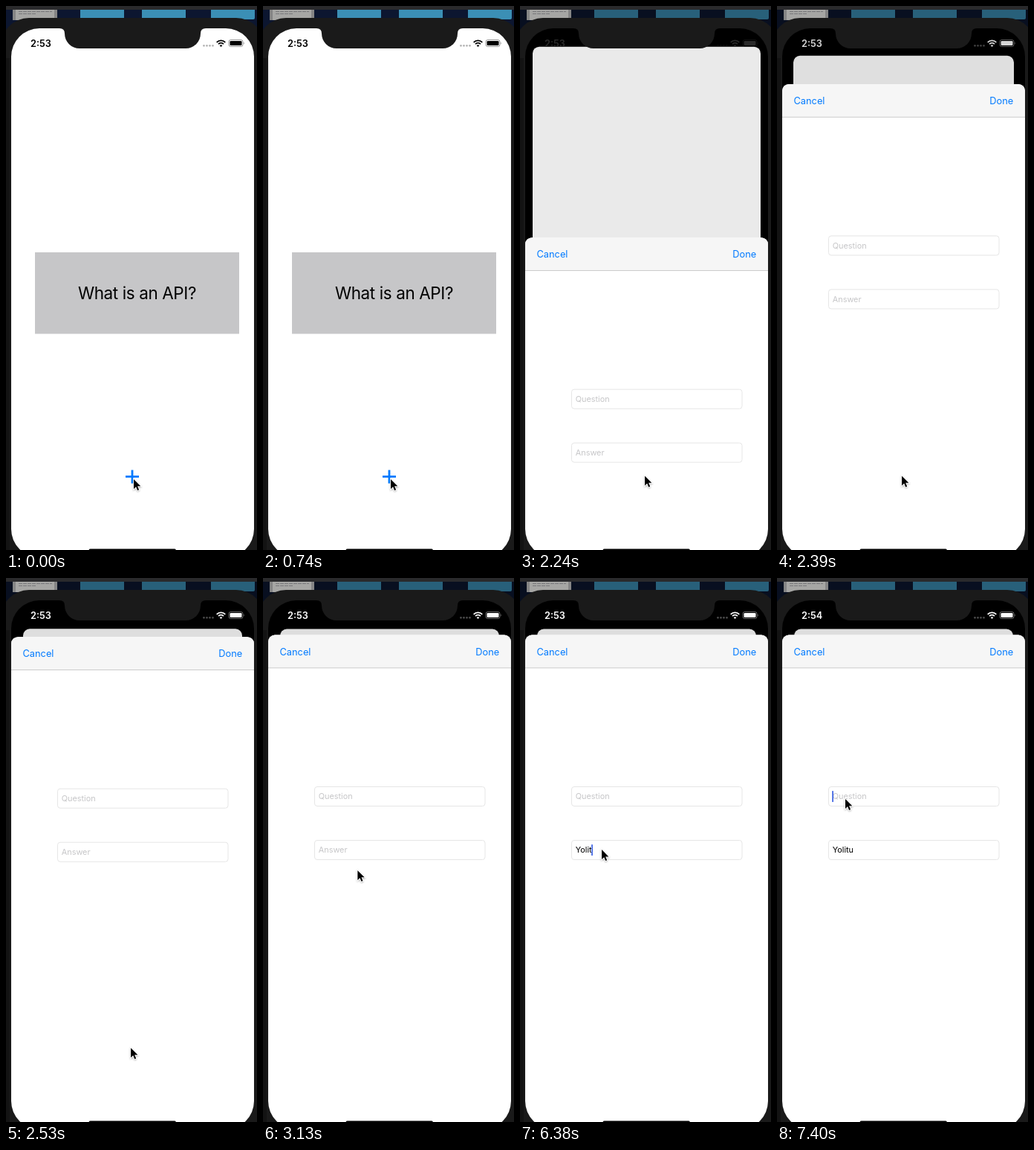
An HTML page for the animation above (8000 ms loop, 338x731 px).

```html
<!DOCTYPE html>
<html lang="en">
<head>
<meta charset="utf-8">
<title>Flash card app</title>
<style>
  html, body { margin: 0; width: 100%; height: 100%; overflow: hidden; background: #0b1124; }
  svg { display: block; width: 338px; height: 731px; }
  text { font-family: Inter, Roboto, sans-serif; }
  .card-text { font-size: 22.5px; letter-spacing: -.4px; text-anchor: middle; }
  .button { font-size: 12.8px; fill: #007aff; }
  .input { font-size: 10.9px; }
  .hint { fill: #c6c6c8; }
  .field { fill: #fff; stroke: #e6e6e6; }
  .clock { font-size: 12.7px; font-weight: 600; }
</style>
</head>
<body>
<svg viewBox="0 0 338 731">
  <defs>
    <clipPath id="screen"><rect x="7" y="30" width="327" height="711" rx="38"/></clipPath>
    <filter id="shade" x="-50%" y="-50%" width="200%" height="200%">
      <feDropShadow dx="0" dy="1" stdDeviation=".8" flood-opacity=".35"/>
    </filter>
  </defs>

  <!-- desktop behind the phone -->
  <rect width="338" height="60" fill="#0c1630"/>
  <g fill="#3b8fb5">
    <rect x="100" y="3" width="59" height="15" rx="2"/>
    <rect x="183" y="3" width="59" height="15" rx="2"/>
    <rect x="276" y="3" width="59" height="15" rx="2"/>
  </g>
  <rect id="dim" width="338" height="60" opacity=".33"/>
  <rect x="9" y="5" width="60" height="14" fill="#858585"/>
  <rect x="13" y="5" width="52" height="14" fill="#a6a6a4"/>
  <path d="M17 7.5H62M17 10.5H41" stroke="#77777a" stroke-dasharray="5 1"/>
  <rect width="338" height="5" fill="#2a2a2c"/>
  <rect x="-7" y="16" width="355" height="740" rx="38" fill="#1a1a1a"/>
  <rect y="70" width="5" height="661" fill="#131313"/>

  <g clip-path="url(#screen)">
    <rect x="7" y="30" width="327" height="711"/>
    <rect id="card" height="720"/>
    <g id="home">
      <rect x="39" y="331" width="275" height="109.5" fill="#c6c6c8"/>
      <text class="card-text" x="176.5" y="393.5">What is an API?</text>
      <path id="plus" d="M161 632.4H179M170 623.4V641.4" stroke="#007aff" stroke-width="2.8"/>
    </g>

    <g id="status">
      <text id="clock" class="clock" x="33" y="54.6"></text>
      <path d="M266.5 53.3H279" stroke="currentColor" stroke-width="2.8"
            stroke-linecap="round" stroke-dasharray="0 4" opacity=".3"/>
      <path d="M283.7 48.8A8.2 8.2 0 0 1 295.3 48.8M286 51.1A5 5 0 0 1 293 51.1"
            fill="none" stroke="currentColor" stroke-width="1.9"/>
      <path d="M289.5 55l-1.9-1.9a2.7 2.7 0 0 1 3.8 0z"/>
      <rect x="300" y="45.5" width="19" height="9" rx="2.6" fill="none" stroke="currentColor" opacity=".4"/>
      <rect x="301.5" y="47" width="16" height="6" rx="1.3"/>
      <path d="M320.2 48.6q1.6 1.4 0 2.8z" opacity=".5"/>
    </g>

    <!-- sheet, laid out from its own top edge -->
    <g id="sheet">
      <rect x="7" width="327" height="760" rx="9" fill="#fff"/>
      <path d="M7 44V9a9 9 0 0 1 9-9H325a9 9 0 0 1 9 9V44z" fill="#f6f6f6"/>
      <rect x="7" y="43.9" width="327" height=".9" fill="#c6c6c6"/>
      <text class="button" x="22.5" y="27">Cancel</text>
      <text class="button" x="318.3" y="27" text-anchor="end">Done</text>
      <rect class="field" x="69.5" y="204" width="229.5" height="26" rx="3.5"/>
      <rect class="field" x="69.5" y="276" width="229.5" height="26" rx="3.5"/>
      <text class="input hint" x="74.7" y="220.8">Question</text>
      <text class="input" id="answer" x="74.7" y="292.8"></text>
      <rect id="caret" width="1.8" height="15" rx=".6" fill="#4468e4"/>
    </g>

    <rect x="111.5" y="729.6" width="117.5" height="4.4" rx="2.2"/>
  </g>

  <path d="M72 29V30Q79 30 79 37A20 20 0 0 0 99 57H242A20 20 0 0 0 262 37Q262 30 269 30V29z" fill="#1a1a1a"/>
  <path id="cursor" d="M.5 .5V13.5L3.6 10.6L5.6 15.4L7.6 14.6L5.6 9.8H9.8Z"
        stroke="#fff" stroke-width="1.5" paint-order="stroke" filter="url(#shade)"/>
</svg>

<script>
const LOOP = 8000, TICK = 148;
const PRESS = 14, FOCUS = 25, TYPE = 36, TYPED = 44, LEAVE = 47, REFOCUS = 50;
const BOTTOM = 731, TOP = 76.5;
const WORD = 'Yolitu';

const $ = id => document.getElementById(id);
const set = (id, attrs) => {
  for (const key in attrs) $(id).setAttribute(key, attrs[key]);
};
const clamp = v => Math.min(1, Math.max(0, v));
const show = on => on ? 'visible' : 'hidden';
const gray = v => `rgb(${v},${v},${v})`;

// Mouse moves; an optional bend is the control point of a curve.
const plus = [171.5, 635.5], pressed = [167.6, 631], high = [146, 319];
const answerField = [109.6, 364.6], questionField = [91.5, 296.5];
const moves = [
  { start: 11, end: PRESS, from: plus, to: pressed },
  { start: 17, end: 19, from: pressed, to: high },
  { start: 19, end: 23, from: high, to: answerField, bend: [126, 443] },
  { start: 46, end: REFOCUS, from: answerField, to: questionField }
];

function cursorAt(n) {
  const { start, end, from, to, bend } = moves.findLast(m => m.start <= n) ?? moves[0];
  const u = clamp((n - start) / (end - start));
  return from.map((a, i) => {
    const mid = bend ? bend[i] : (a + to[i]) / 2;
    return (1 - u) ** 2 * a + 2 * u * (1 - u) * mid + u * u * to[i];
  });
}

// Critically damped spring, 0 to 1.
function sheetRise(n) {
  const s = 2.73 * Math.max(0, n - PRESS - .2);
  return 1 - (1 + s) * Math.exp(-s);
}

function lettersAt(n) {
  if (n < TYPE) return 0;
  const u = clamp((n - TYPE) / (TYPED - TYPE));
  return 1 + Math.floor(u * (WORD.length - 1));
}

function draw(n) {
  set('dim', { visibility: show(n >= PRESS - 1) });
  set('plus', { opacity: n >= PRESS ? .45 : 1 });

  // The card behind shrinks and greys as the sheet rises.
  const p = sheetRise(n);
  const inset = Math.round(16 * p);
  set('card', {
    x: 7 + inset, y: 30 + 38.5 * p, width: 327 - 2 * inset,
    rx: p ? 9 : 0, fill: gray(255 - 33 * p)
  });
  set('home', { visibility: show(!p) });
  set('sheet', { transform: `translate(0 ${BOTTOM - (BOTTOM - TOP) * p})` });

  const ink = gray(255 * p ** 4);
  set('status', { fill: ink, color: ink });
  $('clock').textContent = n > TYPED ? '2:54' : '2:53';

  const letters = lettersAt(n);
  const answer = $('answer');
  answer.textContent = WORD.slice(0, letters) || 'Answer';
  answer.classList.toggle('hint', !letters);

  const inQuestion = n >= REFOCUS;
  const blink = Math.abs(n - FOCUS - 4) <= 1;
  const inAnswer = n >= FOCUS && n < LEAVE && !blink;
  const offset = letters && !inQuestion ? answer.getComputedTextLength() : 0;
  set('caret', {
    x: 74.2 + offset, y: inQuestion ? 209.5 : 281.5,
    visibility: show(inAnswer || inQuestion)
  });
  set('cursor', { transform: `translate(${cursorAt(n)})` });
}

function run() {
  draw(Math.floor(performance.now() % LOOP / TICK));
  requestAnimationFrame(run);
}
run();
</script>
</body>
</html>
```
